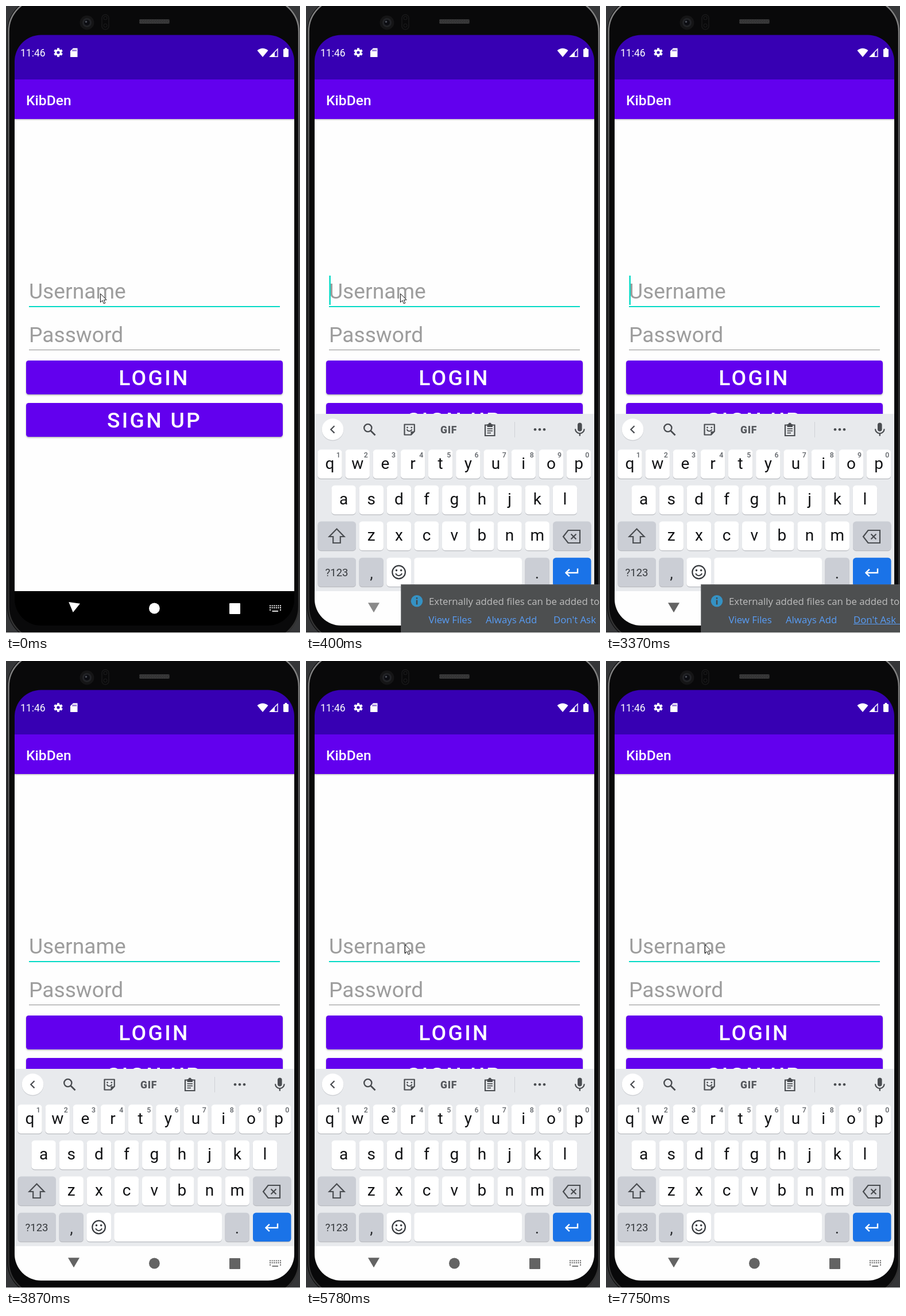
An HTML page with a canvas that plays this animation: 512x1093 px, repeating every 8 s.

```html
<!DOCTYPE html>
<html lang="en">
<head>
<meta charset="utf-8">
<title>Login screen</title>
<style>
  html, body { margin: 0; width: 100%; height: 100%; overflow: hidden; background: #353638; }
  canvas { display: block; width: 512px; height: 1093px; }
</style>
</head>
<body>
<canvas id="stage"></canvas>
<script>
const W = 512, H = 1093, LOOP = 8000;
const canvas = document.getElementById('stage');
const c = canvas.getContext('2d');
const dpr = window.devicePixelRatio || 1;
canvas.width = W * dpr;
canvas.height = H * dpr;

const ROBOTO = 'Roboto, Arial, sans-serif';
const OPEN = '"Open Sans", "Noto Sans", sans-serif';
const PURPLE = '#6200ee', DEEP = '#3700b3', TEAL = '#03dac5';
const ICON = '#4a4d51', KEY_GRAY = '#cbced5';

// Times at which the text caret flips, starting hidden
const CARET = [400, 890, 1390, 1920, 2440, 2850, 3250, 3870, 4370, 4890,
               5260, 5780, 6300, 6830, 7330, 7750];

// Pointer stops: time, then tip position (none = outside the stage)
const POINTER = [
  [0, 164, 501], [2170, 177, 489], [2290, 361, 772], [2440],
  [4120, 502, 1007], [4250, 428, 880], [4370, 332, 742],
  [4490, 238, 604], [4600, 178, 523], [4740, 172, 494]
];

const between = (t, a, b) => t >= a && t < b;

function box(x, y, w, h, r, fill) {
  c.beginPath();
  c.roundRect(x, y, w, h, r);
  c.fillStyle = fill;
  c.fill();
}

function disc(x, y, r, fill) {
  c.beginPath();
  c.arc(x, y, r, 0, Math.PI * 2);
  c.fillStyle = fill;
  c.fill();
}

function ring(x, y, r, color, width, from = 0, to = Math.PI * 2) {
  c.beginPath();
  c.arc(x, y, r, from, to);
  c.strokeStyle = color;
  c.lineWidth = width;
  c.stroke();
}

function trace(pts, closed) {
  c.beginPath();
  pts.forEach(([x, y], i) => i ? c.lineTo(x, y) : c.moveTo(x, y));
  if (closed) c.closePath();
}

function poly(pts, fill) {
  trace(pts, true);
  c.fillStyle = fill;
  c.fill();
}

function line(pts, color, width, closed) {
  trace(pts, closed);
  c.strokeStyle = color;
  c.lineWidth = width;
  c.stroke();
}

function text(s, x, y, font, color, align = 'left', spacing = 0) {
  c.font = font;
  c.fillStyle = color;
  c.textAlign = align;
  c.letterSpacing = spacing + 'px';
  c.fillText(s, x, y);
}

function fade(y0, y1, ...colors) {
  const g = c.createLinearGradient(0, y0, 0, y1);
  colors.forEach((col, i) => g.addColorStop(i / (colors.length - 1), col));
  return g;
}

function phone() {
  c.fillStyle = '#353638';
  c.fillRect(0, 0, W, H);
  box(2, -15, 509, 1122, 60, '#09090a');
  c.beginPath();
  c.roundRect(4.5, -13, 505.5, 1118, 58);
  c.strokeStyle = fade(0, H, '#858585', '#5c5c5c', '#3a3a3a', '#2c2c2c', '#2a2a2a', '#333');
  c.lineWidth = 2.5;
  c.stroke();

  disc(141, 29, 12.5, '#151516');
  disc(141, 29, 8, '#222326');
  disc(141, 29, 5, '#0c0d12');
  disc(139.5, 27.5, 1.7, '#4c4f58');
  c.beginPath();
  c.roundRect(167, 15, 12, 26, 6);
  c.strokeStyle = '#19191a';
  c.lineWidth = 1.5;
  c.stroke();
  ring(173, 21, 3, '#1d1d1e', 1);
  ring(173, 34, 3, '#1d1d1e', 1);

  box(232, 23, 53, 8, 2, '#2d2d2e');
  for (let i = 0; i < 17; i++)
    for (let j = 0; j < 3; j++)
      box(233 + i * 3 + (j % 2), 24 + j * 2.4, 1.5, 1.3, 0, '#505051');
}

function statusBar() {
  c.fillStyle = DEEP;
  c.fillRect(15, 50, 487, 78);
  text('11:46', 25, 88, '17.5px ' + ROBOTO, '#fff');

  disc(91, 81, 5.8, '#fff');
  for (let i = 0; i < 6; i++) {
    c.save();
    c.translate(91, 81);
    c.rotate(i * Math.PI / 3);
    box(-2, -7.8, 4, 5, 0.6, '#fff');
    c.restore();
  }
  disc(91, 81, 2.6, DEEP);

  poly([[117, 73.5], [124.5, 73.5], [124.5, 89], [112, 89], [112, 78.5]], '#fff');
  for (let i = 0; i < 3; i++) box(116 + i * 2.6, 76, 1.2, 3, 0, DEEP);

  c.beginPath();
  c.moveTo(447, 89);
  c.lineTo(437.5, 77.5);
  c.quadraticCurveTo(447, 70, 456.5, 77.5);
  c.closePath();
  c.fillStyle = '#fff';
  c.fill();

  line([[473, 75], [473, 88.2], [459.8, 88.2]], '#fff', 1.4, true);
  poly([[459, 89], [468, 80], [468, 89]], '#fff');

  box(483, 75, 9, 14, 1.2, '#fff');
  box(485.6, 73, 3.8, 3, 0.5, '#fff');
}

function button(y, label, x) {
  c.save();
  c.shadowColor = 'rgba(0,0,0,.3)';
  c.shadowBlur = 2.5 * dpr;
  c.shadowOffsetY = 1.5 * dpr;
  box(35, y, 447, 59, 4.5, PURPLE);
  c.restore();
  text(label, x, y + 43, '500 37.2px ' + ROBOTO, '#fff', 'left', 3.3);
}

function form(t) {
  c.fillStyle = '#fefefe';
  c.fillRect(15, 197, 487, 824);
  c.fillStyle = fade(197, 200, 'rgba(0,0,0,.24)', 'rgba(0,0,0,0)');
  c.fillRect(15, 197, 487, 3);
  c.fillStyle = PURPLE;
  c.fillRect(15, 128, 487, 69);
  text('KibDen', 35, 172.5, '500 24.6px ' + ROBOTO, '#fff');

  const hint = '37.2px ' + ROBOTO;
  text('Username', 40, 510, hint, between(t, 5410, 5530) ? '#757575' : '#9d9d9d');
  box(40, 523, 437, 2, 0, TEAL);
  text('Password', 40, 586, hint, '#9d9d9d');
  box(40, 599, 437, 1, 0, '#8c8c8c');
  if (CARET.filter(k => k <= t).length % 2) box(40.4, 470, 2.5, 51, 0, TEAL);

  button(618, 'LOGIN', 196.3);
  button(692, 'SIGN UP', 176);
}

function key(x, y, w, fill = '#fff') {
  box(x, y + 1.2, w, 50.4, 5.5, '#b9bbc0');
  box(x, y, w, 50.4, 5.5, fill);
}

function toolbar() {
  disc(46.5, 739.2, 19, '#cfd1d5');
  disc(46.5, 738, 18.8, '#fff');
  line([[49.5, 732], [43.3, 738.2], [49.5, 744.4]], ICON, 2.2);

  ring(107.8, 735.5, 6.6, ICON, 2.4);
  line([[112.5, 740.2], [120.5, 748.2]], ICON, 2.8);

  c.lineJoin = 'round';
  line([[171.5, 729.5], [188.8, 729.5], [188.8, 741.5], [183, 747.5], [171.5, 747.5]], ICON, 2.2, true);
  poly([[182.5, 747.5], [182.5, 741.5], [188.8, 741.5]], ICON);
  c.lineJoin = 'miter';
  disc(176.5, 734.8, 1.4, ICON);
  disc(183.8, 734.8, 1.4, ICON);
  ring(180, 736.5, 4.6, ICON, 1.8, 0.3, 2.84);

  text('GIF', 234, 744.5, '900 17.5px ' + ROBOTO, '#56595e', 'left', 0.8);

  line([[312, 730.5], [328.5, 730.5], [328.5, 749], [312, 749]], ICON, 2.2, true);
  box(315.5, 729, 9.5, 5, 0.5, ICON);
  disc(320.2, 729, 2.6, ICON);
  for (let i = 0; i < 3; i++) box(315.5, 736 + i * 3.7, i < 2 ? 9.5 : 6.5, 1.8, 0, ICON);

  box(363, 725, 1, 27, 0, '#d0d2d6');
  for (let i = 0; i < 3; i++) disc(399 + i * 8, 738.3, 2.3, ICON);

  box(473, 726.5, 7.6, 15, 3.8, ICON);
  ring(476.8, 737.2, 7.8, ICON, 2.2, 0, Math.PI);
  box(475.7, 744.5, 2.3, 5, 0, ICON);
}

function letters(row, x, y, hints) {
  [...row].forEach((ch, i) => {
    const mid = x + i * 48.17;
    key(mid - 21.2, y, 42.4);
    text(ch, mid, y + 33.5, '28px ' + ROBOTO, '#111214', 'center');
    if (hints) text((i + 1) % 10, mid + 14.7, y + 13.8, '500 12.4px ' + ROBOTO, '#5f6368', 'center');
  });
}

function keyboard() {
  c.fillStyle = '#e8eaed';
  c.fillRect(15, 711, 487, 310);
  toolbar();
  letters('qwertyuiop', 41.5, 773.3, true);
  letters('asdfghjkl', 65.6, 835.8);
  letters('zxcvbnm', 113.7, 898.6);

  key(20.5, 898.6, 66.5, KEY_GRAY);
  line([[53.5, 911.5], [66.5, 925], [59.8, 925], [59.8, 936], [47.2, 936], [47.2, 925], [40.5, 925]],
       ICON, 2.2, true);
  key(430, 898.6, 66.5, KEY_GRAY);
  line([[448, 925], [456.5, 914], [477, 914], [477, 936], [456.5, 936]], ICON, 2.2, true);
  line([[461.5, 920.5], [470.5, 929.5]], ICON, 2.2);
  line([[470.5, 920.5], [461.5, 929.5]], ICON, 2.2);

  const y = 961.7;
  key(20.5, y, 66.5, KEY_GRAY);
  text('?123', 53.5, 994, '18.5px ' + ROBOTO, '#36393d', 'center');
  key(92.5, y, 42.4, KEY_GRAY);
  text(',', 114, 998, '28px ' + ROBOTO, '#2a2c2f', 'center');
  key(140.3, y, 42.7);
  ring(161.6, 987, 11.3, '#36393d', 2.2);
  disc(157.5, 983.8, 1.8, '#36393d');
  disc(165.7, 983.8, 1.8, '#36393d');
  ring(161.6, 987.2, 5.8, '#36393d', 2, 0.35, Math.PI - 0.35);
  key(188.2, y, 187.8);
  key(381.4, y, 42.4, KEY_GRAY);
  text('.', 402.5, 998, '28px ' + ROBOTO, '#2a2c2f', 'center');
  key(430, y, 66.5, '#1a73e8');
  line([[473, 980.5], [473, 988], [452.5, 988]], '#fff', 2.4);
  line([[458.8, 981.8], [452.5, 988], [458.8, 994.2]], '#fff', 2.4);
}

function navBar(t) {
  const light = t >= 400;
  const color = light ? '#636363' : '#fff';
  c.fillStyle = light ? '#fefefe' : '#000';
  c.fillRect(15, 1020, 487, 61);

  c.save();
  c.translate(118, 1048);
  if (t < 120) c.rotate(0.14);
  const back = between(t, 400, 520) ? '#8a8a8a' : color;
  poly([[-10, -7.8], [10, -7.8], [0, 9.2]], back);
  c.restore();

  disc(258.4, 1050, 9.4, color);
  box(389, 1041, 19, 19, 1, color);
  for (let j = 0; j < 3; j++)
    for (let i = 0; i < 6; i++)
      if (j < 2 || i === 0 || i === 5)
        box(459 + i * 3.6, 1044.5 + j * 3.6, 2, 2, 0, color);
  box(463.5, 1054, 10.5, 1.8, 0, color);
}

function notice(t) {
  c.fillStyle = '#4d4f50';
  c.fillRect(165.5, 1008.5, 347, 83.5);
  c.fillStyle = '#57595a';
  c.fillRect(165.5, 1008.5, 347, 1);
  c.fillRect(165.5, 1008.5, 1, 83.5);
  disc(193, 1037.3, 10.3, '#3592c4');
  box(191.8, 1031, 2.5, 2.6, 0, '#454748');
  box(191.8, 1035.5, 2.5, 8, 0, '#454748');

  const font = '16.8px ' + OPEN, link = '#589df6';
  text('Externally added files can be added to', 214, 1044, font, '#bdbdbd');
  text('View Files', 213.5, 1076, font, link);
  text('Always Add', 313, 1076, font, link);
  text("Don't Ask", 431, 1076, font, link);
  if (between(t, 2850, 3100) || t >= 3370) box(431, 1077, 81, 1, 0, link);
}

function pointer(t) {
  const [, x, y] = POINTER.filter(p => p[0] <= t).pop();
  if (x === undefined) return;
  const arrow = [[0.5, 0.5], [0.5, 15.5], [4, 12.3], [6.3, 17.8], [8.8, 16.8], [6.5, 11.4], [11, 11.2]];
  c.save();
  c.translate(x, y);
  poly(arrow, '#fff');
  line(arrow, '#111', 1, true);
  c.restore();
}

function draw(t) {
  c.setTransform(dpr, 0, 0, dpr, 0, 0);
  phone();
  c.save();
  c.beginPath();
  c.roundRect(15, 50.5, 487, 1029.5, 46);
  c.clip();
  statusBar();
  form(t);
  if (t >= 400) keyboard();
  navBar(t);
  c.restore();
  if (between(t, 400, 3870)) notice(t);
  pointer(t);
  c.fillStyle = '#e6e6e6';
  c.fillRect(0, 1092, W, 1);
}

const start = performance.now();
function tick() {
  draw((performance.now() - start) % LOOP);
  requestAnimationFrame(tick);
}
tick();
</script>
</body>
</html>
```
